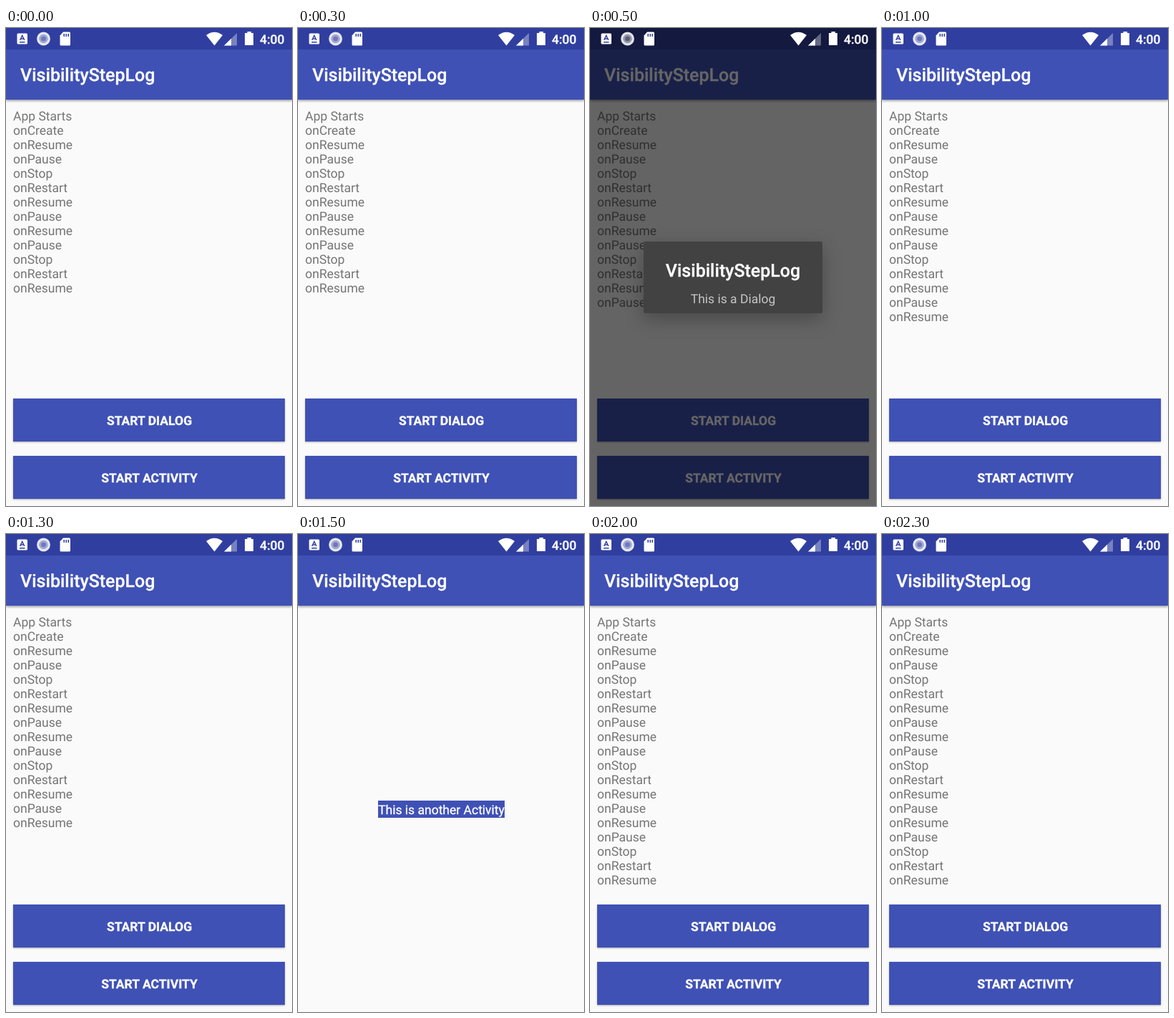
Recreate the animation shown at these times as an HTML page. Size 400 px wide and 667 px high, loop 2500 ms.

```html
<!DOCTYPE html>
<html lang="en">
<head>
<meta charset="utf-8">
<title>Screen states</title>
<style>
  html, body { margin: 0; width: 100%; height: 100%; overflow: hidden; background: #fafafa; }
  svg { display: block; width: 100%; height: 100%; font: 17.5px Roboto, sans-serif; text-rendering: geometricPrecision; }
  .title { font-size: 25px; font-weight: 500; }
  .title, .label, .light { fill: #fff; stroke: #fff; stroke-width: .3px; }
  .mid { text-anchor: middle; }
  .bar { fill: #3f51b5; filter: drop-shadow(0 2px 1.5px #0005); }
  .button { fill: #3f51b5; filter: drop-shadow(0 1.5px 1.2px #0005); }
  .label { font-weight: 700; }
  .card { fill: #424242; filter: drop-shadow(0 8px 12px #0004); }
  #log { fill: #757575; }
</style>
</head>
<body>
<svg viewBox="0 0 400 667">
  <rect width="400" height="667" fill="#fafafa"/>
  <rect class="bar" y="30" width="400" height="70"/>
  <rect width="400" height="30" fill="#303f9f"/>
  <text class="title" x="20" y="74">VisibilityStepLog</text>

  <g id="main">
    <g id="log"></g>
    <rect class="button" x="10" y="517" width="380" height="60"/>
    <text class="label mid" x="200.5" y="554">START DIALOG</text>
    <rect class="button" x="10" y="597" width="380" height="60"/>
    <text class="label mid" x="200.5" y="634">START ACTIVITY</text>
  </g>

  <g id="other">
    <rect x="112" y="372" width="177" height="24" fill="#3f51b5"/>
    <text class="light mid" x="200.5" y="391">This is another Activity</text>
  </g>

  <g id="dialog">
    <rect width="400" height="667" opacity=".6"/>
    <rect class="card" x="75" y="298" width="250" height="100" rx="2"/>
    <text class="title mid" x="200" y="347">VisibilityStepLog</text>
    <text class="mid" x="200" y="384" fill="#c6c6c6">This is a Dialog</text>
  </g>

  <g id="status" fill="#fff">
    <rect x="15.5" y="7.5" width="14.5" height="15" rx="1.5"/>
    <path d="M19.6 17L22.7 10.5L25.8 17M20.8 15H24.6M19 19.8H26.5" fill="none" stroke="#303f9f" stroke-width="1.5"/>
    <g fill="none" stroke="#fff">
      <circle cx="52.5" cy="15" r="7.7" stroke-width="3.4" opacity=".88"/>
      <circle cx="52.5" cy="15" r="4.6" stroke-width="2.8" opacity=".55"/>
    </g>
    <circle cx="52.5" cy="15" r="3.2" opacity=".3"/>
    <path d="M80 5.5H88.5Q90 5.5 90 7V23Q90 24.5 88.5 24.5H77Q75.5 24.5 75.5 23V10.5Z"/>
    <path d="M81.2 8V12M84.2 8V12M87.2 8V12" stroke="#303f9f" stroke-width="1.5"/>
    <path d="M280 10Q291.5 1.5 303 10L291.5 24.5Z"/>
    <path d="M323 7V24.5H305Z" opacity=".35"/>
    <path d="M315 14.8V24.5H305Z"/>
    <path d="M337.5 5H343V7H346V24H334V7H337.5Z"/>
    <text class="light" x="355" y="22" font-weight="500">4:00</text>
  </g>
</svg>
<script>
  const $ = id => document.getElementById(id);
  const resume = "onResume", pause = "onPause", stop = "onStop", restart = "onRestart";
  const away = [pause, stop, restart, resume];
  const lines = ["App Starts", "onCreate", resume, ...away, pause, resume, ...away, pause, resume, ...away];
  const rows = lines.map((line, i) => {
    const row = document.createElementNS("http://www.w3.org/2000/svg", "text");
    row.textContent = line;
    row.setAttribute("x", 10);
    row.setAttribute("y", 129 + 20 * i);
    return $("log").appendChild(row);
  });

  const steps = [
    { screen: "main", count: 13 },
    { screen: "main", count: 14, dialog: true },
    { screen: "main", count: 15 },
    { screen: "other", count: 0 },
    { screen: "main", count: 19 }
  ];
  const show = (node, on) => node.style.display = on ? "" : "none";

  function draw() {
    const step = steps[Math.floor(performance.now() % 2500 / 500)];
    show($("main"), step.screen === "main");
    show($("other"), step.screen === "other");
    show($("dialog"), step.dialog);
    rows.forEach((row, i) => show(row, i < step.count));
    requestAnimationFrame(draw);
  }
  draw();
</script>
</body>
</html>
```
